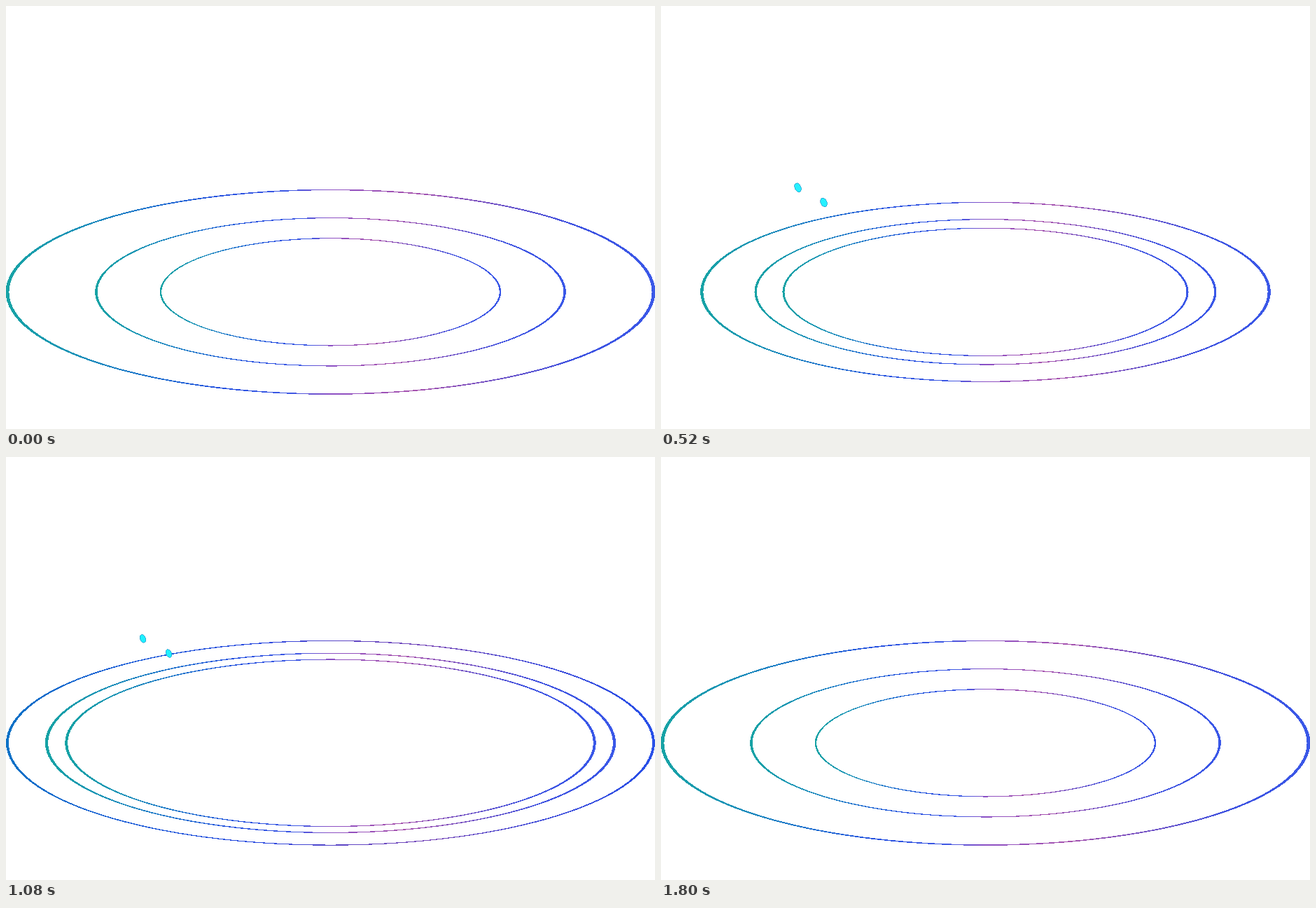
Recreate the animation shown at these times as an HTML page. Size 927 by 604 pixels, loop 1840 ms.

```html
<!DOCTYPE html>
<html lang="en">
<head>
<meta charset="utf-8">
<title>Ripples</title>
<style>
  html, body { margin: 0; width: 100%; height: 100%; overflow: hidden; background: #fff; }
  svg { display: block; width: 927px; height: 604px; }
</style>
</head>
<body>
<svg viewBox="0 0 927 604" shape-rendering="crispEdges">
  <defs>
    <linearGradient id="bright">
      <stop offset="0" stop-color="#17a3a5"/>
      <stop offset=".1" stop-color="#1a93b6"/>
      <stop offset=".22" stop-color="#1a70cc"/>
      <stop offset=".33" stop-color="#2450e0"/>
      <stop offset=".44" stop-color="#3e58e4"/>
      <stop offset=".5" stop-color="#8c50c4"/>
      <stop offset=".63" stop-color="#a652ae"/>
      <stop offset=".76" stop-color="#6c50c6"/>
      <stop offset=".87" stop-color="#3c50e0"/>
      <stop offset="1" stop-color="#3a58e8"/>
    </linearGradient>
    <linearGradient id="fading">
      <stop offset="0" stop-color="#0d72c6"/>
      <stop offset=".2" stop-color="#1a5ad8"/>
      <stop offset=".4" stop-color="#2a48e0"/>
      <stop offset=".52" stop-color="#5c44c4"/>
      <stop offset=".66" stop-color="#7a4cba"/>
      <stop offset=".82" stop-color="#3c48d8"/>
      <stop offset="1" stop-color="#2850e8"/>
    </linearGradient>
  </defs>
  <g id="rings" fill-rule="evenodd"></g>
  <g id="drops" stroke="#2a9fd0" stroke-width=".8"></g>
</svg>
<script>
const LOOP = 1840, STEP = 40, CYCLE = 1800, PULSE = 900;
const CX = 463.5, CY = 408.3, FLATTEN = 0.316;
const BIRTHS = [0, 241, 1242];
const DROPS = [[195.5, 259.3], [232.5, 280.5]];

function add(parent, tag) {
  const node = document.createElementNS('http://www.w3.org/2000/svg', tag);
  return document.getElementById(parent).appendChild(node);
}
const rings = BIRTHS.map(() => add('rings', 'path'));
const drops = DROPS.map(() => add('drops', 'ellipse'));

const mix = (a, b, k) => a + (b - a) * Math.max(0, Math.min(1, k));

function ellipsePath(rx, ry) {
  const arc = `a${rx} ${ry} 0 1 0 `;
  return `M${CX - rx} ${CY}${arc}${2 * rx} 0${arc}${-2 * rx} 0z`;
}

// Fast growth, then slower, then a stop at the stage edge.
function radiusAt(age) {
  return age < 764 ? 242.5 + age * 0.165 : mix(368.5, 461.5, (age - 764) / 795);
}

function drawRing(node, age) {
  const visible = age >= -20 && age < 1690;
  node.setAttribute('visibility', visible ? 'visible' : 'hidden');
  if (!visible) return;
  const fading = age > 1600;
  const r = radiusAt(age);
  const w = r * (fading ? 0.0085 : 0.0105) / 2;
  const h = Math.max(0.6, w * FLATTEN);
  const ry = r * FLATTEN;
  node.setAttribute('d', ellipsePath(r + w, ry + h) + ellipsePath(r - w, ry - h));
  node.setAttribute('fill', fading ? 'url(#fading)' : 'url(#bright)');
}

function drawDrop(node, [x, y], phase) {
  const glow = 1 - Math.abs(phase / PULSE * 2 - 1);
  const size = 0.78 + 0.22 * glow;
  const green = mix(184, 240, (glow - 0.13) / 0.25);
  node.setAttribute('visibility', glow > 0.06 ? 'visible' : 'hidden');
  node.setAttribute('rx', 4.5 * size);
  node.setAttribute('ry', 7 * size);
  node.setAttribute('fill', `rgb(${mix(24, 40, glow)},${green},255)`);
  node.setAttribute('transform', `translate(${x} ${y}) rotate(-25)`);
}

function draw(time) {
  const t = Math.floor(time % LOOP / STEP) * STEP;
  rings.forEach((node, i) => {
    const age = (t - BIRTHS[i] + CYCLE + 100) % CYCLE - 100;
    drawRing(node, age);
  });
  drops.forEach((node, i) => drawDrop(node, DROPS[i], t % PULSE));
}

const start = performance.now();
function tick() {
  draw(performance.now() - start);
  requestAnimationFrame(tick);
}
tick();
</script>
</body>
</html>
```
